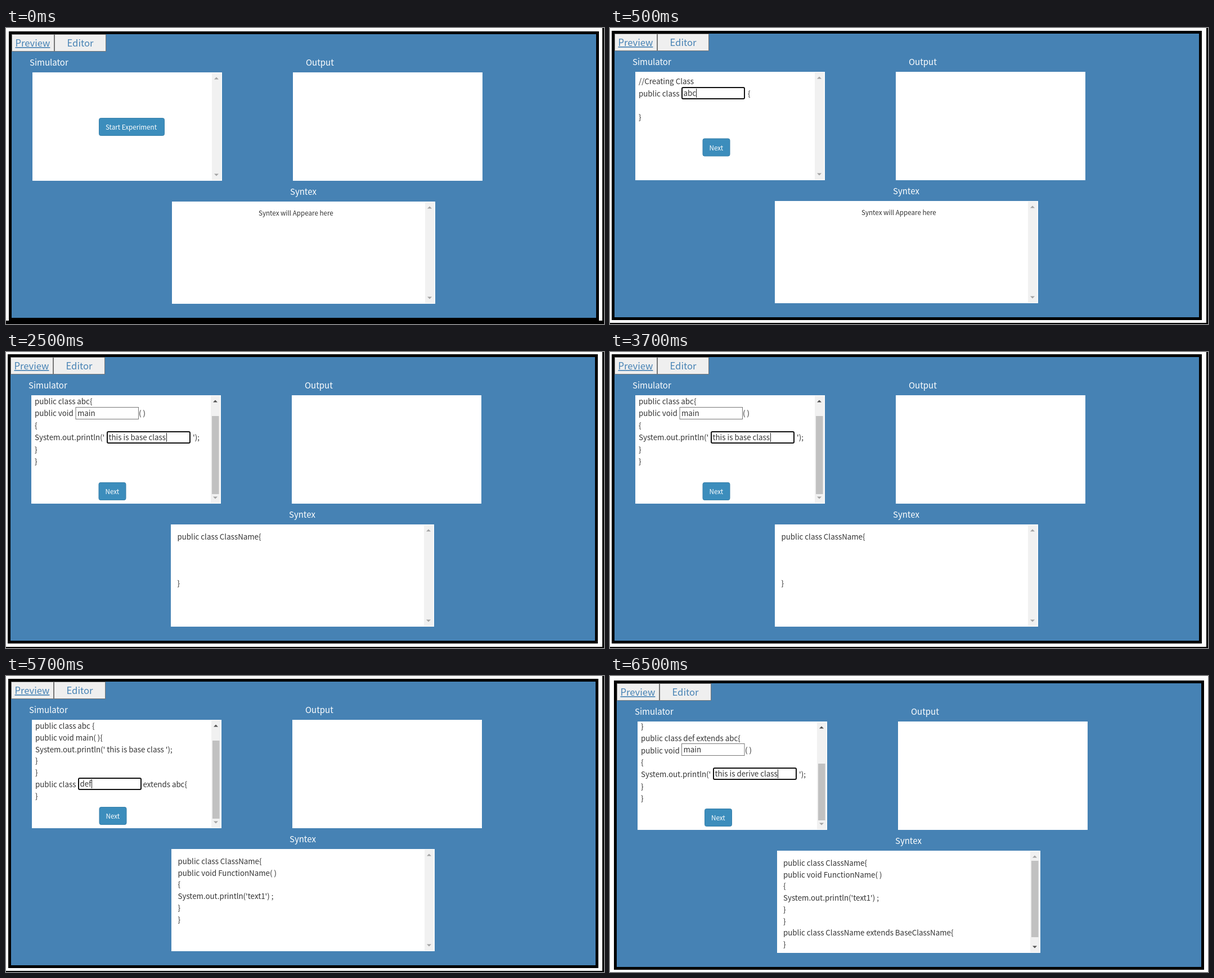
An HTML page that plays this animation: 1063x527 px, repeating every 8 s.

```html
<!DOCTYPE html>
<html lang="en">
<head>
<meta charset="utf-8">
<style>
html, body { margin: 0; width: 100%; height: 100%; overflow: hidden; background: #fff; }
svg { display: block; width: 1063px; height: 527px; }
text { font-family: "Noto Sans CJK JP", "Noto Sans CJK SC", "Noto Sans CJK", "Open Sans", sans-serif; white-space: pre; }
</style>
</head>
<body>
<svg id="stage" viewBox="0 0 1063 527"></svg>
<script>
const LOOP = 8000;
const SIZE = { small: 11.63, code: 13.33, title: 14.98, tab: 16.63 };
const LINE = 20.7;

const rect = (x, y, w, h, fill, extra = '') =>
  `<rect x="${x}" y="${y}" width="${w}" height="${h}" fill="${fill}" ${extra}/>`;
const text = (x, y, str, size = SIZE.code, fill = '#333', extra = '') =>
  `<text x="${x}" y="${y}" font-size="${size}" fill="${fill}" ${extra}>${str}</text>`;
const lines = (x, y, list, step = LINE) =>
  list.map((str, i) => text(x, Math.round(y + i * step), str)).join('');

const arrow = (x, y, dir, active) =>
  `<path d="M${x - 4} ${y + 2 * dir}h8l-4 ${-4 * dir}z" fill="${active ? '#505050' : '#a3a3a3'}"/>`;

function scrollbar(x, top, bottom, thumb) {
  const mid = x + 8;
  let out = rect(x, top, 16.5, bottom - top, '#f1f1f1');
  if (thumb) out += rect(x + 2, thumb.y, 12.5, thumb.h, '#c1c1c1');
  return out + arrow(mid, top + 9.5, 1, thumb && thumb.up) + arrow(mid, bottom - 9.5, -1, thumb && thumb.down);
}

function button(x, y, w, label) {
  return rect(x + .5, y + .5, w - 1, 31, '#3c8dbc', 'rx="3" stroke="#367fa9"') +
    text(x + 12, y + 21, label, SIZE.small, '#fff');
}

const field = (x, y, w, value) =>
  rect(x + .5, y + .5, w - 1, 21, '#fff', 'stroke="#767676"') + text(x + 3.5, y + 16, value);

const focusField = (x, y, w, value, caret) =>
  rect(x + 1, y + 1, w - 2, 20, '#fff', 'rx="2" stroke="#101010" stroke-width="2"') +
  text(x + 3.5, y + 16, value) + rect(caret, y + 3, 1, 16, '#222');

const tab = (x, w, label, textX, extra) =>
  rect(x + .5, 11.5, w - 1, 30, '#efefef', 'stroke="#767676"') +
  text(textX, 33, label, SIZE.tab, '#4682b4', extra);

function page({ dx, dy, simThumb, syntaxThumb }) {
  return `<g transform="translate(${dx} ${dy})">` +
    rect(5, 6, 1049, 515, '#000') +
    rect(10, 11, 1039, 505, '#4682b4') +
    tab(10, 76, 'Preview', 16.5, 'text-decoration="underline"') +
    tab(86, 92, 'Editor', 108.5) +
    text(42, 67, 'Simulator', SIZE.title, '#fff') +
    text(533, 67, 'Output', SIZE.title, '#fff') +
    text(505, 297, 'Syntex', SIZE.title, '#fff') +
    rect(47, 79, 337, 193, '#fff') +
    rect(510, 79, 337, 193, '#fff') +
    rect(295, 309, 468, 182, '#fff') +
    scrollbar(366, 80, 271, simThumb) +
    scrollbar(745, 310, 490, syntaxThumb) + '</g>';
}

const screenEdge = bottom => rect(1060, 0, 3, 527, '#000') + rect(0, bottom, 1063, 527 - bottom, '#000');
const hint = (x, y) => text(x, y, 'Syntex will Appeare here', SIZE.small);
const classSyntax = ['public class ClassName{', 'public void FunctionName( )', '{', "System.out.println('text1') ;", '}', '}'];

const scenes = [
  {
    start: 0, dx: 0, dy: 0, edge: 521,
    body: button(165, 160, 117, 'Start Experiment') + hint(449, 334)
  },
  {
    start: 500, dx: -2, dy: -1, edge: 525,
    body: text(51, 100, '//Creating Class') + text(51, 122, 'public class') +
      focusField(127, 105, 113, 'abc', 153) + text(245, 122, '{') + text(51, 164, '}') +
      button(164.5, 196.5, 49, 'Next') + hint(447, 333)
  },
  {
    start: 2500, dx: -2, dy: -2, edge: 525, simThumb: { y: 116, h: 139, up: true },
    body: lines(51, 93, ['public class abc{', 'public void', '{', "System.out.println('", '}', '}'], 21.4) +
      field(123.5, 98, 112.5, 'main') + text(236, 114, '( )') +
      focusField(179, 141, 149, 'this is base class', 285) + text(332, 157, "');") +
      button(164.5, 232, 49, 'Next') +
      text(304.5, 334, 'public class ClassName{') + text(304.5, 417, '}')
  },
  {
    start: 4500, dx: -1, dy: -1, edge: 525, simThumb: { y: 116, h: 139, up: true },
    body: lines(52, 94, ['public class abc {', 'public void main( ){', "System.out.println(' this is base class ');", '}', '}', 'public class', '}'], 20.8) +
      focusField(128, 181, 113, 'def', 152) + text(243.5, 198, 'extends abc{') +
      button(165.5, 233, 49, 'Next') + lines(305.5, 335, classSyntax)
  },
  {
    start: 6500, dx: 2, dy: 2,
    simThumb: { y: 154, h: 101, up: true }, syntaxThumb: { y: 327, h: 136, down: true },
    body: lines(55, 95, ['}', 'public class def extends abc{', 'public void', '{', "System.out.println('", '}', '}'], 21.3) +
      field(127, 120, 112.5, 'main') + text(240, 137, '( )') +
      focusField(183, 163, 149, 'this is derive class', 298) + text(336, 180, "');") +
      button(168, 236, 49, 'Next') +
      lines(308, 338, [...classSyntax, 'public class ClassName extends BaseClassName{', '}'])
  }
];

const stage = document.getElementById('stage');
let shown;

function render(time) {
  const t = time % LOOP;
  const scene = scenes.findLast(s => s.start <= t);
  if (scene !== shown) {
    shown = scene;
    stage.innerHTML = (scene.edge ? screenEdge(scene.edge) : '') + page(scene) + scene.body;
  }
}

const origin = performance.now();
function tick() {
  render(performance.now() - origin);
  requestAnimationFrame(tick);
}
tick();
</script>
</body>
</html>
```
